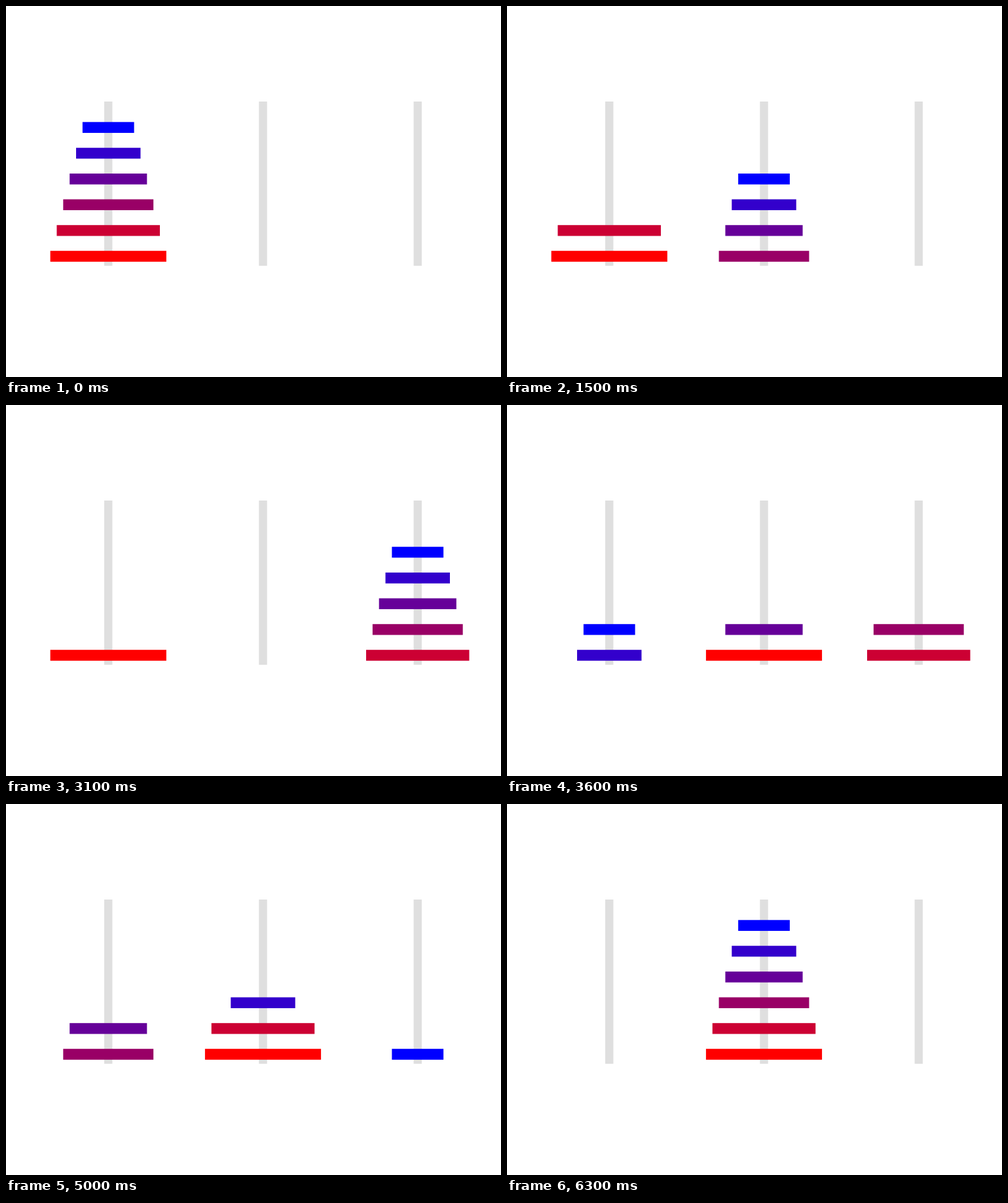
Write an HTML page with a canvas that moves like this. It is 756 px wide and 567 px high and loops after 6.4 s.

```html
<!DOCTYPE html>
<html>
<head>
<meta charset="utf-8">
<title>Tower of Hanoi</title>
<style>
  html, body { margin: 0; height: 100%; overflow: hidden; background: #fff; }
  canvas { display: block; }
</style>
</head>
<body>
<canvas id="stage" width="756" height="567"></canvas>
<script>
const ctx = document.getElementById('stage').getContext('2d');
const DISCS = 6, STATES = 2 ** DISCS, STEP_MS = 100;
const PEG_GAP = 236.25, LEVEL_GAP = 39.375;
const pegX = peg => 156.25 + peg * PEG_GAP;

function centredRect(x, y, w, h, color) {
  ctx.fillStyle = color;
  ctx.fillRect(x - w / 2, y - h / 2, w, h);
}

// Each disc always cycles in one direction; neighbouring sizes go opposite ways.
function pegOf(disc, moves) {
  const count = Math.floor((moves + 2 ** disc) / 2 ** (disc + 1));
  const direction = (DISCS - disc) % 2 ? 1 : 2;
  return count * direction % 3;
}

function draw(moves) {
  ctx.fillStyle = '#fff';
  ctx.fillRect(0, 0, 756, 567);
  for (let peg = 0; peg < 3; peg++) centredRect(pegX(peg), 271.5, 12.4, 251, '#dfdfdf');

  const heights = [0, 0, 0];
  for (let disc = DISCS - 1; disc >= 0; disc--) {
    const peg = pegOf(disc, moves);
    const y = 382.5 - LEVEL_GAP * heights[peg]++;
    const color = `rgb(${51 * disc}, 0, ${255 - 51 * disc})`;
    centredRect(pegX(peg), y, PEG_GAP * (4 + disc) / 12, 16.6, color);
  }
}

const start = performance.now();
function tick() {
  draw(Math.floor((performance.now() - start) / STEP_MS) % STATES);
  requestAnimationFrame(tick);
}
tick();
</script>
</body>
</html>
```
